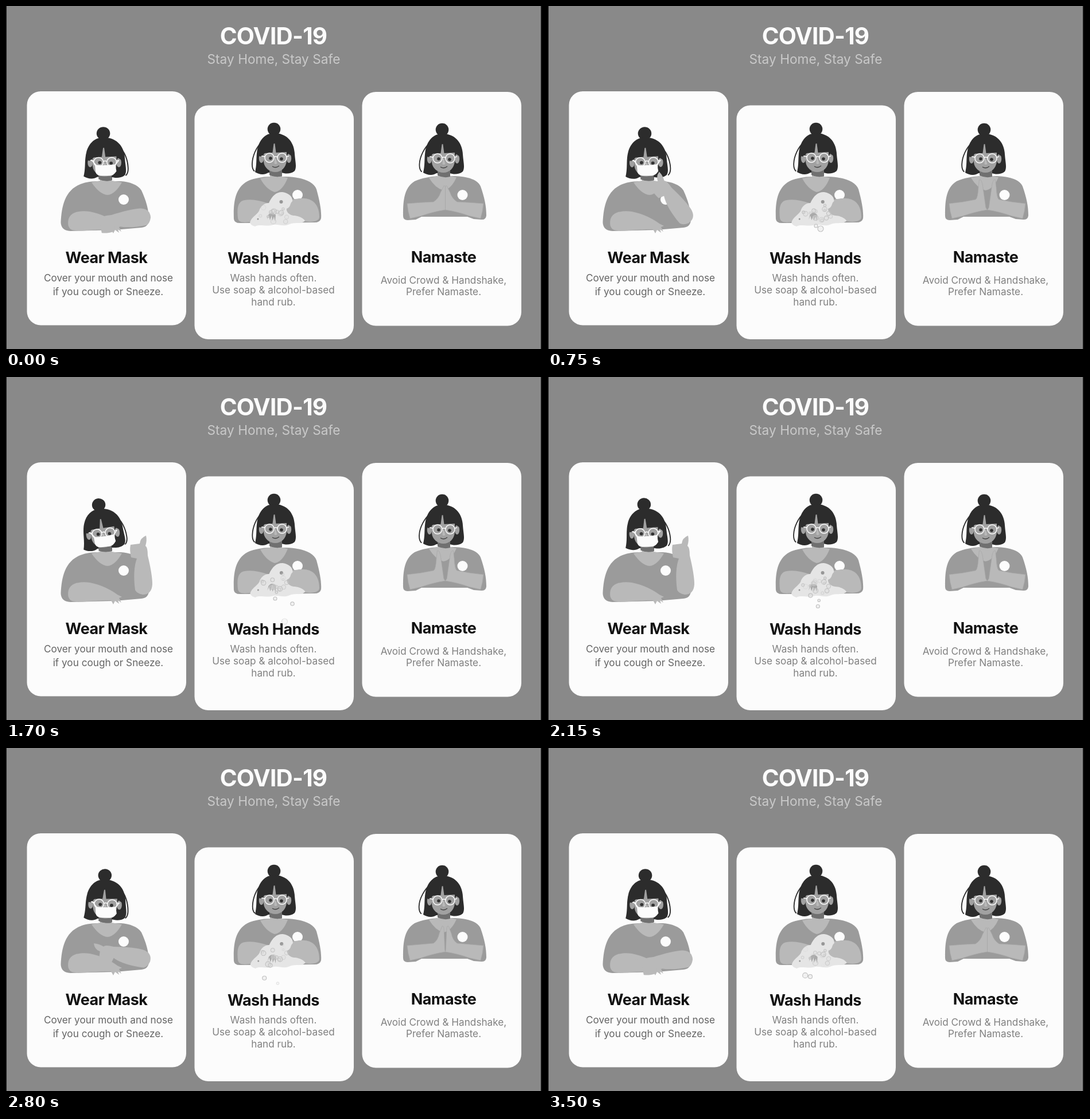
Write an HTML page that moves like this. It is 934x599 px and loops after 3.55 s.

```html
<!DOCTYPE html>
<html lang="en">
<head>
<meta charset="utf-8">
<title>Stay Home, Stay Safe</title>
<style>
html, body { margin: 0; width: 100%; height: 100%; overflow: hidden; background: #898989; }
svg { display: block; width: 934px; height: 599px; }
text { font: 17.2px Inter, sans-serif; text-anchor: middle; fill: #808080; }
.title { font-size: 27px; font-weight: 700; letter-spacing: -.02em; fill: #111; }
.dark text:not(.title) { fill: #646464; }
.main { font-size: 40.5px; font-weight: 700; letter-spacing: -.02em; fill: #fcfcfc; }
.sub { font-size: 22.7px; fill: #c9c9c9; }
.card, .mask, .badge { fill: #fcfcfc; }
.hair { fill: #2c2c2c; }
.strand { fill: none; stroke: #2c2c2c; stroke-width: 1.8; stroke-linecap: round; }
.shirt { fill: #9b9b9b; }
.skin { fill: #b9b9b9; }
.face { fill: #a1a1a1; }
.shade { fill: #707070; }
.line { fill: none; stroke: #fcfcfc; stroke-width: 1.5; }
.ring { fill: #dcdcdc55; stroke: #c2c2c2; stroke-width: 1.2; }
.hand { stroke: #a6a6a6; stroke-width: .7; }
</style>
</head>
<body>
<svg viewBox="0 0 934 599">
  <defs>
    <g id="head">
      <circle class="hair" cx="467" cy="215" r="11.3"/>
      <path class="hair" d="M434 290C437 278 436 266 437 258C439 234 452 222 467 222C488 222 502 236 503 258C504 272 507 281 503 288C496 294 486 293 480 291H457C450 296 440 294 434 290Z"/>
      <path class="shade" d="M459 284h22v13q-10 3-22-2z"/>
      <path class="face" d="M449 252V272C450 283 460 290 469 290C480 290 488 282 489 270V252Q469 228 449 252Z"/>
      <ellipse class="face" cx="445" cy="266" rx="4.2" ry="8"/>
      <ellipse class="face" cx="493" cy="266" rx="4.2" ry="8"/>
      <path class="hair" d="M439 262C440 238 452 225 468 225C486 225 499 240 499 262Q493 260 490 255L470.5 256L467.5 233L464.5 256L451 257Q447 260 446 263Z"/>
      <path class="skin" d="M468 266h2l2.500 9q-3 2-5 0z"/>
      <circle cx="461" cy="266" r="2.800" fill="#333"/>
      <circle cx="480" cy="267" r="2.800" fill="#333"/>
      <g class="line">
        <circle cx="459" cy="265" r="8"/>
        <circle cx="481" cy="265" r="8"/>
        <path d="M467 264q3-2 6 0M451 263l-6-1M489 263l4-1"/>
      </g>
      <path d="M464 280q6 4 12-1" fill="none" stroke="#444" stroke-width="1.300"/>
    </g>
  </defs>

  <rect width="934" height="599" fill="#898989"/>
  <path fill="#111" d="M0 0h1v599h-1zM932 0h2v599h-2z"/>
  <text class="main" x="466" y="67">COVID-19</text>
  <text class="sub" x="466.500" y="101">Stay Home, Stay Safe</text>
  <g class="card">
    <rect x="36.500" y="149" width="277.500" height="408.500" rx="24"/>
    <rect x="328.500" y="173.500" width="277.500" height="408.500" rx="24"/>
    <rect x="620.500" y="150" width="277.500" height="408.500" rx="24"/>
  </g>

  <g class="dark">
    <text class="title" x="175" y="449">Wear Mask</text>
    <text x="178.500" y="481">Cover your mouth and nose</text>
    <text x="178" y="505">if you cough or Sneeze.</text>
  </g>
  <text class="title" x="466" y="450">Wash Hands</text>
  <text x="466" y="481">Wash hands often.</text>
  <text x="466" y="502">Use soap &amp; alcohol-based</text>
  <text x="466" y="523">hand rub.</text>
  <text class="title" x="762.500" y="448">Namaste</text>
  <text x="762.500" y="485">Avoid Crowd &amp; Handshake,</text>
  <text x="762.500" y="505">Prefer Namaste.</text>

  <!-- mask -->
  <path class="shirt" d="M95.500 378C97 350 102 322 130 311C140 307 150 306 164 306H200C215 307 230 312 236 322C244 340 249 355 249 374Q248 386 236 387L190 391L112 393Q96 392 95.500 378Z"/>
  <path class="skin" d="M149 308L164 305V292H184V305L202 308Q190 329 177 330Q163 329 149 308Z"/>
  <path class="shade" d="M163 294h22v10q-12 3-22-1z"/>
  <g id="maskHead">
    <path class="strand"/>
    <use href="#head"/>
    <path class="line" d="M447 261L456 272M493 262L486 271"/>
    <path class="mask" d="M453 270Q470 272 487 269L489 281Q484 289 478 289H462Q455 288 454 282Z"/>
  </g>
  <circle class="badge" cx="205" cy="338" r="9"/>
  <path class="skin" d="M109 372C113 359 130 357 146 359C166 363 184 372 194 380L202 384L197 386L201 394L195 390L197 396L190 391L187 397L183 390C160 389 130 395 115 391C108 388 107 380 109 372Z"/>
  <path id="forearm" class="skin" d="M225 372C222 350 223 330 228 317L218 315Q215 302 217 293L233 291Q234 281 244 277Q246 285 243 295Q247 297 247 312Q255 345 255 362Q254 380 238 380Q228 378 225 372Z"/>

  <!-- wash -->
  <path class="shirt" d="M397 372C396 345 398 315 425 304C440 299 452 298 462 298H488C515 299 536 306 541 320C547 342 550 358 549 371Q547 379 535 378L410 379Q398 380 397 372Z"/>
  <path class="skin" d="M443 301L460 298V290H481V298L491 300Q482 323 468 325Q453 320 443 301Z"/>
  <path class="shade" d="M459 288h22v9q-12 3-22-2z"/>
  <path id="washStrand" class="strand"/>
  <use href="#head"/>
  <circle class="badge" cx="508" cy="330" r="9"/>
  <path class="skin" d="M404 370C402 350 405 341 416 339C430 337 442 340 455 344L475 348L460 374L425 377C410 379 405 377 404 370ZM546 368C546 350 537 337 520 336C505 335 490 340 475 345L480 365L500 370C520 379 546 380 546 368Z"/>
  <g id="foam">
    <path fill="#e5e5e5" d="M425 378C428 368 436 366 441 358C443 350 450 344 458 344C464 330 473 324 482 325C493 327 500 333 499 341C494 345 497 351 489 354C488 360 494 365 501 366C510 366 519 371 521 375C514 382 503 377 494 381C484 386 476 381 466 382C454 386 440 380 434 385Q426 383 425 378Z"/>
    <path d="M455 373l3-7 2 8 3-8 1 9 3-7 2 8 1-11q-7-8-13 0z" fill="#a9a9a9"/>
    <circle cx="479.500" cy="342" r="3" fill="#979797"/>
    <circle cx="439" cy="372" r="1.500" fill="#979797"/>
  </g>
  <g id="bubbles"></g>

  <!-- namaste -->
  <path class="shirt" d="M692 367C692 345 692 318 712 306C725 300 740 298 752 297H782C805 298 822 303 827 315C834 335 837 350 837 366Q836 374 828 373L815 372L804 368H724L714 373L700 374Q692 374 692 367Z"/>
  <path class="skin" d="M737 300L753 297V290H774V297L785 299Q776 320 762 322Q748 318 737 300Z"/>
  <path class="shade" d="M752 288h22v9q-12 3-22-2z"/>
  <g transform="translate(293 1)">
    <path id="prayStrand" class="strand"/>
    <use href="#head"/>
  </g>
  <circle class="badge" cx="795.500" cy="330" r="9"/>
  <path class="skin hand"/>
  <path class="skin hand" transform="translate(1531) scale(-1 1)"/>
</svg>
<script>
const LOOP = 3550, STEP = 50;
const $ = s => document.querySelector(s);
const clamp = v => Math.max(0, Math.min(1, v));
const mix = (a, b, k) => a + (b - a) * k;

// Eased interpolation through [time, value] keys.
function track(keys, t) {
  const i = keys.findIndex(k => k[0] > t);
  if (i < 0) return keys[keys.length - 1][1];
  const [t0, a] = keys[i - 1], [t1, b] = keys[i];
  const u = (t - t0) / (t1 - t0);
  return mix(a, b, u * u * (3 - 2 * u));
}

const headTilt = [[0, 0], [400, -5.5], [1080, 3.5], [1220, 3], [1760, -6.3], [1880, -6], [2480, 4.3], [3100, 0]];
const armTurn = [[0, -94], [300, -94], [1050, 0], [2300, 0], [3000, -94]];
const palmGap = [[0, 0], [100, 0], [700, 1], [2200, 1], [2550, .38], [3100, .12], [3450, 0]];

// Falling bubbles: reference time, x, y, speed per second, radius, end time.
const drops = [
  [750, 475, 389, 11, 40, 5, 1850], [750, 467, 384, 7, 32, 3, 1500],
  [1700, 469, 387, 3, 30, 3, 2750], [1700, 499, 396, 7, 30, 3.2, 2150],
  [2550, 473, 403, 2, 32, 2.2, 2950], [2550, 453, 394, -11, 31, 3.5, 3400],
  [3100, 453, 386, -12, 28, 4.5, 3900], [3100, 459, 388, -5, 28, 3.5, 3900]
];

let seed = 11;
const random = () => (seed = seed * 16807 % 2147483647) / 2147483647;
const specks = Array.from({ length: 14 }, () => ({
  x: 448 + random() * 43, y: 342 + random() * 22,
  r: 1.5 + random() * 3, drift: random() * 12 - 6, phase: random()
}));

function addRing() {
  const ring = document.createElementNS("http://www.w3.org/2000/svg", "circle");
  ring.setAttribute("class", "ring");
  return $("#bubbles").appendChild(ring);
}
function setRing(ring, cx, cy, r, opacity) {
  for (const [name, value] of Object.entries({ cx, cy, r, opacity })) ring.setAttribute(name, value);
}
const dropRings = drops.map(addRing), speckRings = specks.map(addRing);

function strandPath(sway, side = 1) {
  const x = v => side > 0 ? v : 939 - v;
  return `M${x(446)} 238C${x(436)} 246 ${x(430 + sway)} 262 ${x(429.5 + sway)} 275Q${x(429 + sway)} 284 ${x(433 + sway)} 288`;
}

function draw(t) {
  const swing = Math.sin(t / LOOP * Math.PI * 6);
  $("#maskHead").setAttribute("transform",
    `translate(172.7 299.5) rotate(${track(headTilt, t)}) scale(1.04 1) translate(-470 -292)`);
  $("#maskHead .strand").setAttribute("d", strandPath(1 + swing, -1));
  $("#forearm").setAttribute("transform", `rotate(${track(armTurn, t)} 240 368)`);

  $("#washStrand").setAttribute("d", strandPath(-.5 + swing));
  $("#prayStrand").setAttribute("d", strandPath(-2 - swing));
  $("#foam").setAttribute("transform", `translate(${swing} 0)`);

  drops.forEach(([ref, x, y, vx, vy, r, end], i) => {
    const s = (t - ref) / 1000;
    const opacity = Math.min(clamp((s + 1.1) * 4), clamp((end - t) / 350));
    setRing(dropRings[i], x + vx * s, y + vy * s, r, opacity);
  });
  specks.forEach((b, i) => {
    const p = (t / LOOP * 3 + b.phase) % 1;
    setRing(speckRings[i], b.x + b.drift * p, b.y + 17 * p, b.r, Math.sin(Math.PI * p));
  });

  const k = track(palmGap, t);
  const tipX = mix(764, 752.5, k), tipY = mix(313, 302.5, k);
  const innerX = mix(765.5, 762, k), innerY = mix(351, 346, k);
  const palm = `M699 345Q722 343 745 ${mix(342, 338, k)}Q${mix(754, 749, k)} 336 ${mix(757, 750, k)} ${mix(326, 316, k)}` +
    `L${tipX - 1} ${tipY + 1}Q${tipX + 2} ${tipY - 1} ${mix(765.5, 757, k)} ${tipY + 8}` +
    `L${innerX} ${innerY}Q${innerX} 353 765.5 356Q745 359 722 367L704 371Q700 358 699 345Z`;
  document.querySelectorAll(".hand").forEach(hand => hand.setAttribute("d", palm));
}

function frame(now) {
  draw(Math.floor(now % LOOP / STEP) * STEP);
  requestAnimationFrame(frame);
}
draw(0);
requestAnimationFrame(frame);
</script>
</body>
</html>
```
